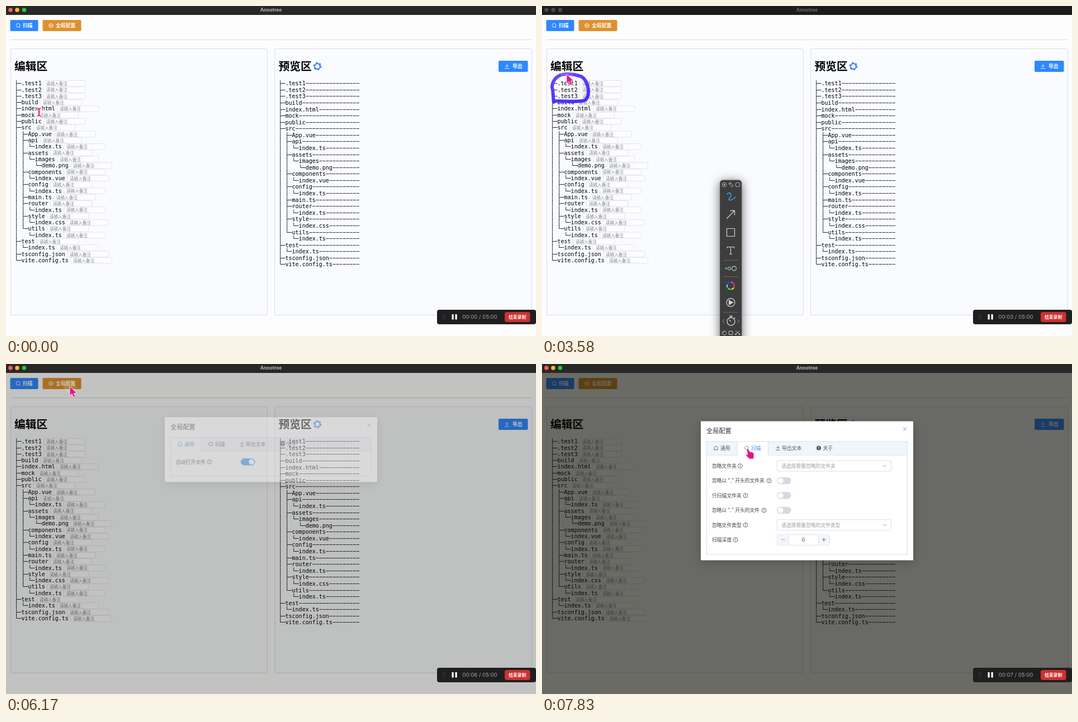
Recreate the animation shown at these times as an HTML page. Size 948 by 591 pixels, loop 8000 ms.

```html
<!DOCTYPE html>
<html lang="zh">
<head>
<meta charset="utf-8">
<style>
html, body { margin: 0; width: 100%; height: 100%; overflow: hidden; background: #fdfdfe }
svg { display: block; width: 948px; height: 591px }
text { font-family: "Noto Sans CJK SC", "Noto Sans CJK", sans-serif; white-space: pre }
.mono { font-family: "DejaVu Sans Mono", monospace }
.ui { font-family: Inter, sans-serif }
#tools { filter: drop-shadow(0 3px 9px rgba(0, 0, 0, .6)) }
#box { filter: drop-shadow(0 4px 8px rgba(0, 0, 0, .2)) }
</style>
</head>
<body>
<svg id="stage" viewBox="0 0 948 591"></svg>
<script>
const LOOP = 8000, STEP = 1000 / 12;
const BLUE = '#2f88ff', GREY = '#dcdfe6', INK = '#3f4146', HINT = '#9b9da3';

const rect = (x, y, w, h, fill, more = '') =>
  `<rect x="${x}" y="${y}" width="${w}" height="${h}" fill="${fill}" ${more}/>`;
const frame = (x, y, w, h, line, fill = 'none', r = 2) =>
  rect(x + .5, y + .5, w - 1, h - 1, fill, `stroke="${line}" rx="${r}"`);
const text = (x, y, s, size, fill = '#000', more = '') =>
  `<text x="${x}" y="${y}" font-size="${size}" fill="${fill}" ${more}>${s}</text>`;
const path = (d, stroke, w = 1, more = '') =>
  `<path d="${d}" fill="none" stroke="${stroke}" stroke-width="${w}" ${more}/>`;
const disc = (x, y, r, fill) => `<circle cx="${x}" cy="${y}" r="${r}" fill="${fill}"/>`;
const ring = (x, y, r, line, w = 1, more = '') =>
  `<circle cx="${x}" cy="${y}" r="${r}" fill="none" stroke="${line}" stroke-width="${w}" ${more}/>`;
const group = (id, body) => `<g id="${id}">${body}</g>`;

const lens = (x, y, c) => ring(x, y, 3.3, c, .9) + path(`M${x + 2.4} ${y + 2.4}l1.8 1.8`, c, .9);
const load = (x, y, c) => path(`M${x} ${y - 4}v5m-2.5-2.5l2.5 2.5l2.5-2.5M${x - 4} ${y + 3.8}h8`, c, .9);
const home = (x, y, c) => path(`M${x - 3} ${y + 3.5}v-4.5l3-2.8l3 2.8v4.5z`, c, .9);
const gear = (x, y, r, c, w) => ring(x, y, r, c, w) +
  ring(x, y, r * 1.3, c, w, `stroke-dasharray="${r * .55} ${r * .811}"`);
const info = (x, y) => ring(x, y, 3.9, INK, .8) + path(`M${x} ${y - 2.2}v2.8m0 .8v1`, INK, .9);

const tree = `.test1
.test2
.test3
build
index.html
mock
public
src
 App.vue
 api
  index.ts
 assets
  images
   demo.png
 components
  index.vue
 config
  index.ts
 main.ts
 router
  index.ts
 style
  index.css
 utils
  index.ts
test
 index.ts
tsconfig.json
vite.config.ts`.split('\n').map(s => ({ name: s.trim(), depth: s.search(/\S/) }));

// True when another sibling follows on the given level
const more = (i, level) => tree.slice(i + 1).find(n => n.depth <= level)?.depth === level;

const rows = tree.map(({ name, depth }, i) => {
  let s = '';
  for (let k = 0; k < depth; k++) s += more(i, k) ? '│ ' : '  ';
  return s + (more(i, depth) ? '├─' : '└─') + name;
});

function editRow(s, i) {
  const y = 142.2 + i * 11.315, end = 16 + s.length * 6.02;
  return frame(Math.round(end + 3), y - 9.2, 75, 11.6, '#e1e4ee', '#fdfdff') +
    text(end + 7.7, y - .2, '请输入备注', 7.6, '#85878d') +
    text(15.5, y, s, 10, '#000', 'class="mono"');
}
const viewRow = (s, i) =>
  text(487.5, 142.2 + i * 11.58, s.padEnd(24, '−'), 10, '#000', 'class="mono"');

const page = rect(0, 0, 948, 591, '#fdfdfe') +
  rect(8, 60, 933, 1, '#d9dae0') +
  rect(7.5, 25, 50, 20, BLUE, 'rx="2"') + lens(21.5, 34.6, '#fff') +
  text(30, 38.3, '扫描', 8.9, '#fff', 'font-weight="700"') +
  rect(65.5, 25, 69, 20, '#de9030', 'rx="2"') + gear(80.5, 35, 3.1, '#fff', .9) + disc(80.5, 35, 1, '#fff') +
  text(89, 38.3, '全局配置', 8.9, '#fff', 'font-weight="700"') +
  frame(8, 76, 460, 478, '#d9deec', '#f9fbfe') + frame(480, 76, 461, 478, '#d9deec', '#f9fbfe') +
  text(15, 114.7, '编辑区', 19.8, '#000', 'font-weight="700"') +
  text(487.5, 114.7, '预览区', 19.8, '#000', 'font-weight="700"') +
  gear(557, 108, 4.9, '#4078ff', 2.2) +
  rect(881, 98, 52.5, 20, BLUE, 'rx="2"') + load(896, 108, '#fff') +
  text(906, 111.3, '导出', 8.9, '#fff', 'font-weight="700"') +
  rows.map(editRow).join('') + rows.map(viewRow).join('');

const lights = c => [8, 20, 32.5].map((x, i) => disc(x, 7, 3.8, c[i])).join('');
const bar = (fill, ink, c) => rect(0, 0, 948, 16, fill) + lights(c) +
  text(474, 10, 'Annotree', 8.5, ink, 'class="ui" font-weight="700" text-anchor="middle"');

const ICON = '#d4d4d4';
const hues = [0, 60, 120, 180, 240, 300].map((h, i) =>
  ring(337.5, 501, 6.6, `hsl(${h},85%,60%)`, 2.2,
    `stroke-dasharray="5.6 36" transform="rotate(${i * 60 - 30} 337.5 501)"`)).join('');
const tools = rect(318.5, 312, 38.5, 290, '#3d3d3d', 'rx="5" stroke="#565656"') +
  ring(326, 320, 3.8, ICON, .8) + disc(326, 320, 1.3, ICON) +
  path('M334 318l3-2l5 6l-2 2zM337 316l-1 3', ICON, .8) + ring(350, 320, 4, ICON, .8) +
  path('M331 337c4-5 10 0 5 6s2 7 10-1', '#3d9ee8', 1.7, 'stroke-linecap="round"') +
  path('M330 381l14.5-14.5m-8 0h8v8', ICON, 1.3) +
  path('M330.5 398.5h14v14h-14z', ICON, 1.2) +
  path('M331.5 434v-2.5h12v2.5m-6-2.5v13m-2.5 0h5', ICON, 1.2) +
  path('M324 455.5h27M324 484.5h27M324 548.5h27', '#666') +
  disc(329, 470, 2, '#3d9ee8') + ring(335, 470, 2.7, ICON) + ring(343.5, 470, 3.9, ICON, 1.1) +
  hues + ring(337.5, 531, 7.4, ICON, 1.2) +
  `<path d="M334 526v10l8.5-5z" fill="${ICON}"/>` +
  ring(338, 565, 7, ICON, 1.3) + path('M335 555.5h6m-3 0v2.5m0 7l-3-3M344 558l1.5 1.5', ICON, 1.3) +
  path('M325.5 561l-2 3.5l2 3.5M350 561l2 3.5l-2 3.5', '#a0a0a0', .9) +
  path('M323 588c-2-5 0-4 1-3v-3m2 2v-3m2 3v-2.5m2 3c0 6-5 5-7 3.5M334.5 582.5h6.5v6h-6.5zM346 582l7 5m-7 1l7-6', ICON, .9) +
  ring(346.5, 588, 1.2, ICON, .8) + ring(353, 588, 1.2, ICON, .8);

const TAB = '#55585e', MEDIUM = 'font-weight="500"';
const TABS = [[294, 55.5, '通用', 311, home], [349, 56, '扫描', 366, lens]];
const tabHead = on => rect(294.5, 138, 359, 25, '#f1f5fc') + rect(294, 162.5, 360, 1, '#e1e5ef') +
  TABS.map(([x, w, s, ix, icon], i) => {
    const c = i === on ? BLUE : TAB;
    return (i === on ? rect(x, 138.5, w, 25, '#fff') + path(`M${x + .5} 138v25m${w - 1}-25v25`, GREY) : '') +
      icon(ix, 150, c) + text(ix + 8, 153.6, s, 8.9, c, MEDIUM);
  }).join('') +
  load(422, 150, TAB) + text(429, 153.6, '导出文本', 8.9, TAB, MEDIUM) +
  disc(495, 150, 4, TAB) + path('M495 147.5v3m0 1v1', '#fff') +
  text(502.5, 153.6, '关于', 8.9, TAB, MEDIUM);
const label = (y, s, ix) => text(304, y + 3.5, s, 8.8, INK) + info(ix, y);
const toggle = (y, on) => rect(420, y - 6.3, 25.5, 12.6, on ? BLUE : '#d6d9df', 'rx="6.3"') +
  disc(on ? 439.2 : 426.5, y, 5, '#fff');
const select = (y, s) => frame(420, y - 10, 205, 20, GREY, '#fff') +
  text(428, y + 3.4, s, 8.8, HINT) + path(`M609.5 ${y - 1.5}l3.3 3.3l3.3-3.3`, HINT, .9);
const panel = (h, on, body) => rect(284, 102, 380, h, '#fff', 'rx="1"') +
  text(294, 123.7, '全局配置', 11.2, '#303133') +
  path('M646 113l6 6m0-6l-6 6', '#85878c', .9) +
  tabHead(on) + frame(294, 138, 360, h - 46, GREY, 'none', 0) + body;

const general = panel(116, 0, label(182, '自动打开文件', 364) + toggle(182, true));
const scan = panel(249, 1,
  label(182.1, '忽略文件夹', 354.5) + select(182.1, '请选择需要忽略的文件夹') +
  label(208.6, '忽略以 "." 开头的文件夹', 406) + toggle(208.6) +
  label(235.1, '只扫描文件夹', 364) + toggle(235.1) +
  label(261.6, '忽略以 "." 开头的文件', 397) + toggle(261.6) +
  label(287.9, '忽略文件类型', 364) + select(287.9, '请选择需要忽略的文件类型') +
  label(314.3, '扫描深度', 346) + frame(420, 304.6, 95, 20, GREY, '#fff') +
  rect(420.5, 305.1, 20, 19, '#f3f6fb') + rect(494, 305.1, 20, 19, '#f3f6fb') +
  path('M440.5 305v19.5M494.5 305v19.5', GREY) +
  path('M427.5 314.3h7', HINT, .9) + path('M500.5 314.3h7m-3.5-3.5v7', '#606266', .9) +
  text(467.3, 317.6, '0', 8.9, INK, 'class="ui" text-anchor="middle"'));

const dots = [552.5, 555.3, 558, 561].map(y => disc(782, y, .6, '#666') + disc(785, y, .6, '#666')).join('');
const recorder = rect(771, 544, 177, 26, '#1f1f20', 'rx="4"') + dots +
  rect(797.5, 552, 3.2, 9.5, '#fff') + rect(803.5, 552, 3.2, 9.5, '#fff') +
  text(847.5, 560, '', 9.6, '#a2a2a2', 'id="clock" class="ui" text-anchor="middle"') +
  rect(892, 548, 45.5, 18, '#cf3131', 'rx="4"') +
  text(899, 560, '结束录制', 7.8, '#fff', 'font-weight="700"');

const pen = 'stroke-linecap="round" stroke-linejoin="round"';
const cursorShape = (id, d) => `<path id="${id}" d="${d}" fill="#e5128c" stroke="#fff" stroke-width=".8"/>`;

stage.innerHTML = `<linearGradient id="ink" gradientUnits="userSpaceOnUse" x1="50" y1="172" x2="30" y2="122">
  <stop stop-color="#4630ff"/><stop offset="1" stop-color="#6c43ff"/></linearGradient>` +
  page +
  group('active', bar('#282828', '#b6b6b6', ['#ff5f57', '#febc2e', '#28c840'])) +
  group('idle', bar('#1c1c1c', '#6a6a6a', Array(3).fill('#484848'))) +
  rect(0, 16, 948, 575, '#0a0a00', 'id="shade"') +
  group('box', group('general', general) + group('scan', scan)) +
  group('tools', tools) + recorder +
  path('M21 170C45 171 68 172 76 169C88 164 84 128 66 125C48 120 32 120 23 131C18 138 17 145 19 149C20 158 20 165 21 172',
    'url(#ink)', 6, 'id="loop1" ' + pen) +
  path('M78 48C110 54 150 50 156 40C158 30 150 22 138 19C110 15 64 16 64 32C64 42 68 47 76 49',
    '#8238ff', 6, 'id="loop2" ' + pen) +
  group('cursor', disc(0, 0, 11, 'rgba(255,250,190,.15)') +
    cursorShape('beam', 'M-4-8h3l1 1l1-1h3v2.5h-2.5v11h2.5v2.5h-3l-1-1l-1 1h-3v-2.5h2.5v-11h-2.5z') +
    cursorShape('arrow', 'M0 0v17l4-3.5l3 6.500l3-1.5l-2.5-6l5-.5z') +
    cursorShape('hand', 'M-3-1c1-2 3-1 3.5 0l2 4l5 1c2 .5 2.5 2 2.5 4v5l-1 3h-7l-5-5c-2-3-1-4 1-3l1 .5z'));

const $ = id => document.getElementById(id);
const clamp = v => Math.min(1, Math.max(0, v));
const ramp = (t, a, b) => clamp((t - a) / (b - a));
const show = (id, v) => $(id).setAttribute('opacity', +v);

// Eased or linear value along [time, ...values] keys
function along(keys, t, ease = p => p) {
  const i = keys.findIndex(k => k[0] > t);
  if (i === 0) return keys[0].slice(1);
  if (i < 0) return keys.at(-1).slice(1);
  const a = keys[i - 1], b = keys[i], p = ease(ramp(t, a[0], b[0]));
  return a.slice(1).map((v, j) => v + (b[j + 1] - v) * p);
}

const strokes = [
  { id: 'loop1', keys: [[740, 0], [1500, .48], [2420, .88], [2920, 1]], fade: [3750, 4200] },
  { id: 'loop2', keys: [[4080, 0], [4670, .49], [5330, 1]], fade: [5480, 5700] }
];
const moves = [[60, 59, 190], [590, 21, 170], [2920, 21, 172], [3200, 21, 172], [4080, 78, 48],
  [5330, 76, 49], [5450, 76, 49], [5920, 114, 40], [6400, 114, 40], [6850, 248, 128], [7500, 367, 153], [7700, 369, 154]];

function draw(t) {
  let [x, y] = along(moves, t, p => p * p * (3 - 2 * p));
  for (const { id, keys, fade } of strokes) {
    const el = $(id), len = el.getTotalLength(), [p] = along(keys, t), start = keys[0][0];
    el.setAttribute('stroke-dasharray', `${Math.max(.01, p * len)} ${len * 2}`);
    show(id, t < start ? 0 : 1 - ramp(t, ...fade));
    if (t >= start && t < keys.at(-1)[0]) ({ x, y } = el.getPointAtLength(p * len));
  }
  $('cursor').setAttribute('transform', `translate(${x} ${y})`);
  const shape = t < 240 ? 'beam' : t < 7300 ? 'arrow' : 'hand';
  for (const id of ['beam', 'arrow', 'hand']) show(id, id === shape);

  show('idle', t > 240 && t < 5650);
  show('tools', ramp(t, 200, 480) * (1 - ramp(t, 5480, 5750)));

  const open = ramp(t, 6048, 6340);
  show('shade', .6 * open);
  show('box', open);
  $('box').setAttribute('transform', `translate(0 ${.4 - 12 * (1 - open)})`);
  show('general', t < 7580);
  show('scan', t >= 7580);
  $('clock').textContent = `00:0${Math.max(0, Math.floor((t - 100) / 1000))} / 05:00`;
}

function tick(now) {
  draw(Math.floor((now % LOOP + 4) / STEP) * STEP);
  requestAnimationFrame(tick);
}
tick(performance.now());
</script>
</body>
</html>
```
